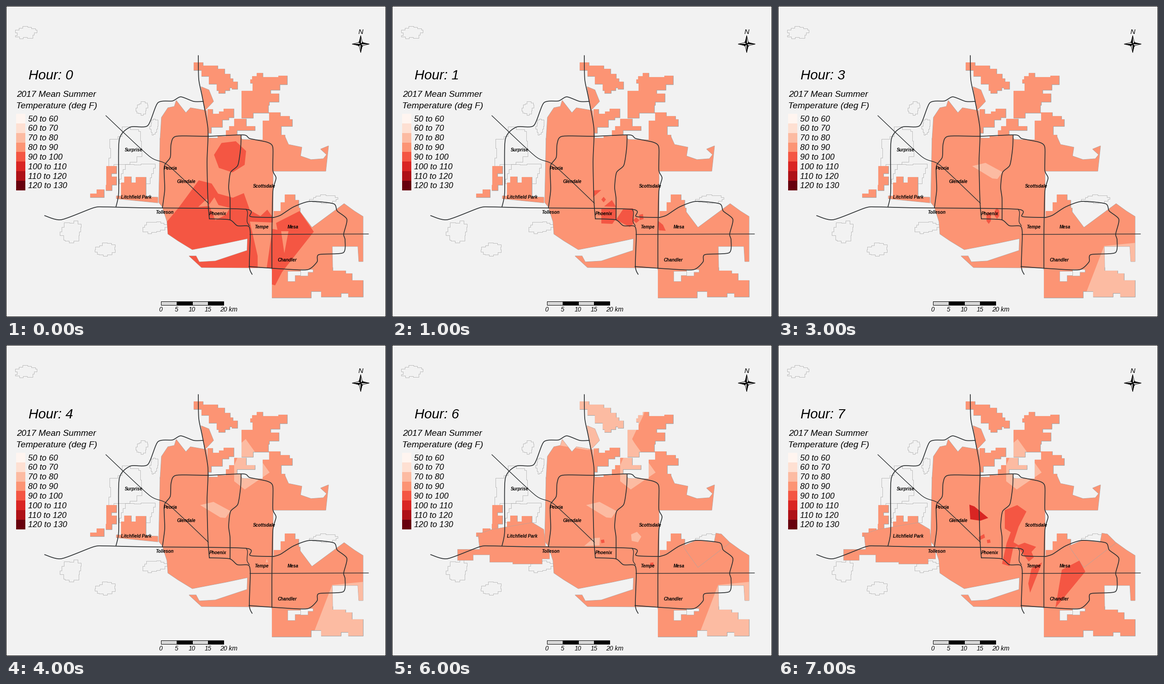
Write a matplotlib script that moves like this. It is 826 by 678 pixels and loops after 8 s.

```python
import numpy as np
import matplotlib.pyplot as plt
from matplotlib.animation import FuncAnimation
from matplotlib.patches import Circle, Polygon, Rectangle
from matplotlib.path import Path

W, H, DPI = 826, 678, 64
PT = 72 / DPI  # points per pixel
BG, ROAD, BORDER = "#f2f2f2", "#2b2f31", "#a5a5a5"
REDS = ["#fff5f0", "#fee0d2", "#fcbba2", "#fc9474",
        "#f45643", "#d92523", "#ae1117", "#67000d"]
LIGHT, WARM, HOT, DEEP = REDS[2:6]
rng = np.random.default_rng(4)

fig = plt.figure(figsize=(W / DPI, H / DPI), dpi=DPI, facecolor="black")
ax = fig.add_axes([0, 0, 1, 1])
ax.set_xlim(0, W)
ax.set_ylim(H, 0)
ax.axis("off")
ax.add_patch(Rectangle((1, 1), W - 2, H - 2, fc=BG, lw=0, zorder=0))


# --- shape rules -------------------------------------------------------------
def pts(*xy):
    return np.array(xy, float).reshape(-1, 2)


def steps(*xy):
    """Closed outline of right angles: across, then down, to each key point."""
    key = pts(*xy)
    ahead = np.roll(key, -1, axis=0)
    corner = np.column_stack([ahead[:, 0], key[:, 1]])
    return np.stack([key, corner], axis=1).reshape(-1, 2)


def cell(x, y, rx, ry, n=5, turn=0.0):
    a = turn + np.arange(n) * 2 * np.pi / n
    return np.column_stack([x + rx * np.cos(a), y + ry * np.sin(a)])


def town(x, y, rx, ry, n=14):
    """Ragged town border."""
    ring = cell(0, 0, rx, ry, n) * rng.uniform(0.65, 1.0, (n, 1))
    return steps(*(ring + (x, y)).ravel())


def curve(*xy, tension=0.35):
    """Smooth path through key points."""
    p = pts(*xy)
    slope = tension * (np.vstack([p[1:], p[-1:]]) - np.vstack([p[:1], p[:-1]]))
    t = np.linspace(0, 1, 9)[:, None]
    parts = [(2 * t**3 - 3 * t**2 + 1) * a + (t**3 - 2 * t**2 + t) * u
             + (3 * t**2 - 2 * t**3) * b + (t**3 - t**2) * v
             for a, b, u, v in zip(p, p[1:], slope, slope[1:])]
    return np.vstack(parts)


def ccw(p):
    x, y = p.T
    area = np.sum(x * np.roll(y, -1) - y * np.roll(x, -1))
    return p if area > 0 else p[::-1]


def fill(p, color, z, edge="none", lw=0.0):
    return ax.add_patch(Polygon(p, closed=True, fc=color, ec=edge,
                                lw=lw * PT, zorder=z))


def label(x, y, s, px, ha="left", weight="normal"):
    return ax.text(x, y, s, fontsize=px * PT, family="Liberation Sans",
                   style="italic", weight=weight, ha=ha, va="baseline",
                   color="black", zorder=8)


# --- land --------------------------------------------------------------------
north = steps(408, 123, 428, 130, 460, 137, 475, 148, 487, 158, 493, 165,
              503, 181, 491, 178, 486, 184, 476, 190, 462, 184, 458, 170,
              441, 153, 425, 140)
stem = pts(424, 176, 441, 183, 451, 208, 432, 228)
crown = pts(335, 292, 338, 243, 352, 222, 366, 219, 370, 206, 391, 233,
            401, 222, 436, 228, 441, 292)
shoulder = steps(438, 225, 449, 235, 463, 230, 473, 224, 495, 243, 484, 248,
                 470, 264, 446, 277, 438, 292)
knee = steps(460, 284, 478, 271, 485, 262, 496, 246, 522, 262, 541, 271,
             502, 282, 510, 292)
centre = pts(332, 428, 335, 288, 511, 288, 514, 291, 560, 292, 580, 305,
             581, 571, 425, 570, 398, 545, 413, 545, 420, 558, 455, 556,
             485, 546, 524, 533, 525, 507, 478, 517, 405, 531, 374, 512,
             352, 497, 350, 470, 340, 438)
column = steps(512, 185, 536, 168, 531, 160, 535, 153, 545, 146, 558, 155,
               592, 152, 611, 171, 595, 183, 575, 191, 593, 209, 572, 216,
               570, 232, 596, 240, 616, 247, 622, 262, 598, 281, 606, 304,
               575, 300, 558, 250, 572, 233, 537, 244)
arm = pts(579, 303, 606, 284, 614, 302, 643, 308, 640, 327, 663, 335,
          690, 333, 697, 324, 684, 312, 701, 305, 695, 360, 579, 360)
bump = steps(582, 447, 597, 428, 606, 411, 628, 423, 636, 440, 639, 462)
valley = pts(578, 461, 638, 447, 665, 483, 735, 431, 757, 447, 776, 459,
             776, 557, 767, 557, 765, 524, 709, 524, 710, 575, 578, 575)
foot = steps(578, 570, 710, 577, 738, 583, 752, 598, 776, 634, 744, 626,
             728, 634, 685, 622, 663, 636)
enclaves = [
    steps(218, 349, 240, 365, 229, 372, 240, 390, 230, 402, 217, 390),
    steps(257, 372, 272, 385, 282, 373, 304, 416, 250, 385),
    pts(240, 414, 330, 417, 330, 429, 240, 420),
    steps(183, 409, 197, 400, 213, 417),
]
land = [north, stem, crown, shoulder, knee, centre, column, arm, bump,
        valley, foot] + enclaves

# areas that join the map later
extra = [
    pts(638, 447, 633, 438, 662, 425, 700, 430, 704, 410, 716, 412, 735, 431,
        665, 485),
    pts(187, 412, 217, 402, 305, 387, 330, 402, 334, 440, 190, 441),
    steps(142, 445, 190, 438, 342, 466, 326, 477, 262, 473, 212, 457,
          176, 469),
]
holes = [steps(612, 578, 640, 587, 628, 600),
         steps(640, 574, 667, 580, 656, 588)]
towns_x_y_size = [(42, 58, 26, 15), (295, 222, 13, 17), (322, 262, 10, 20),
                  (262, 310, 45, 50), (285, 365, 45, 28), (142, 492, 28, 28),
                  (215, 531, 28, 17), (322, 482, 30, 16), (690, 421, 32, 11)]

for box in towns_x_y_size:
    fill(town(*box), "none", 0.5, BORDER, 0.7)
for p in land:
    fill(p, WARM, 1, BORDER, 1.2)
    fill(p, WARM, 1.5)
for p in holes:
    fill(p, BG, 4, BORDER, 0.6)

clip = Path.make_compound_path(
    *[Path(np.vstack([q, q[:1]]), closed=True) for q in map(ccw, land + extra)])

# --- temperature patches and the hours in which each one shows ---------------
timed = [(fill(p, WARM, 1.6, BORDER, 0.6), (5, 6, 7)) for p in extra]


def patch(color, hours, shape):
    art = fill(shape, color, 3)
    art.set_clip_path(clip, ax.transData)
    timed.append((art, hours))


patch(HOT, [0], pts(330, 510, 350, 470, 375, 440, 419, 380, 447, 387, 461, 409,
                    493, 418, 517, 408, 530, 445, 553, 458, 568, 444, 580, 461,
                    580, 472, 530, 470, 547, 545, 547, 575, 380, 575))
patch(WARM, [0], pts(441, 434, 453, 417, 462, 434, 487, 440, 478, 455,
                     455, 467))
patch(WARM, [0], pts(418, 438, 437, 420, 441, 436))
patch(HOT, [0], cell(488, 328, 36, 35, 7, 0.55))
patch(HOT, [0], pts(579, 486, 590, 488, 587, 473, 638, 447, 669, 492, 600, 580,
                    585, 609, 578, 607, 567, 569))
patch(WARM, [0], pts(598, 491, 614, 491, 605, 539))

patch(HOT, [1], pts(438, 402, 455, 401, 437, 417))
patch(HOT, [1], cell(460, 422, 5, 6, 4))
patch(HOT, [1], pts(478, 423, 487, 438, 461, 437))
patch(HOT, [1], pts(455, 441, 487, 440, 488, 462, 479, 475, 455, 474))
patch(HOT, [1], pts(487, 466, 503, 442, 524, 441, 525, 474, 517, 482))
patch(HOT, [1], cell(531, 467, 7, 6, 4))
patch(HOT, [1], cell(542, 460, 6, 8, 4, 0.6))
patch(HOT, [1], pts(578, 468, 589, 477, 595, 490, 580, 489))

patch(HOT, [2, 3], cell(458, 462, 5.5, 13, 6, 0.5))
patch(HOT, [2, 3], cell(476, 452, 5.5, 12, 6, 0.5))
patch(LIGHT, [2, 3, 4, 5, 6], pts(422, 349, 451, 342, 488, 362, 477, 377,
                                  466, 376))
patch(LIGHT, [3, 4, 5, 6], pts(709, 523, 780, 516, 780, 640, 664, 640))
patch(LIGHT, [4], cell(567, 471, 3, 5, 3, -np.pi / 2))
patch(LIGHT, [4, 5, 6, 7], pts(521, 205, 573, 278, 519, 315, 496, 297,
                               496, 262, 503, 246, 512, 213))
patch(LIGHT, [5, 6], pts(355, 100, 560, 100, 547, 152, 522, 205, 545, 246,
                         505, 246, 505, 218, 425, 229, 364, 219))
patch(LIGHT, [6], pts(418, 438, 438, 421, 452, 420, 451, 437))
patch(LIGHT, [6], cell(530, 419, 12, 12, 5, -0.1))
patch(HOT, [6, 7], cell(458, 428, 5, 5, 4, 0.6))
patch(HOT, [6], cell(565, 478, 5, 5, 4, 0.6))

patch(DEEP, [7], pts(416, 348, 427, 352, 457, 377, 440, 383, 418, 380))
patch(HOT, [7], pts(493, 360, 520, 349, 540, 363, 523, 396, 512, 430, 524, 437,
                    511, 443, 503, 482, 487, 477, 497, 432, 506, 408, 493, 400))
patch(HOT, [7], pts(518, 438, 536, 431, 561, 440, 551, 451, 556, 463,
                    545, 472, 524, 444))
patch(HOT, [7], pts(436, 419, 448, 412, 450, 420, 437, 426))
patch(HOT, [7], pts(551, 487, 574, 474, 548, 540, 544, 520))
patch(HOT, [7], pts(617, 490, 655, 470, 668, 494, 603, 573))


# --- roads -------------------------------------------------------------------
def road(*xy, lw=1.7):
    x, y = curve(*xy).T
    ax.plot(x, y, color=ROAD, lw=lw * PT, zorder=6,
            solid_joinstyle="round", solid_capstyle="round")


road(418, 108, 419, 160, 427, 200, 439, 268, 437, 340, 439, 425, 442, 464)
road(442, 464, 486, 466, 503, 479, 527, 480, 531, 498, 529, 568, 535, 585)
road(84, 457, 120, 466, 190, 440, 215, 438, 300, 440, 520, 443, 531, 459,
     582, 461)
road(582, 461, 597, 456, 625, 438, 660, 426, 712, 431, 720, 447, 741, 465,
     734, 497, 737, 510, 733, 538, 680, 542, 676, 558, 655, 575, 598, 573,
     528, 568)
road(530, 498, 788, 497, lw=1.4)
road(217, 239, 312, 328, 352, 347, 440, 430, lw=1.4)
road(239, 438, 245, 405, 246, 292, 270, 264, 308, 261, 330, 211, 362, 207,
     380, 198, 408, 208, 429, 208)
road(340, 440, 345, 400, 344, 350, 357, 330, 359, 300, 370, 284, 440, 284,
     516, 281, 530, 289, 568, 297, 580, 308, 580, 358, 587, 375, 580, 405,
     578, 500, 578, 572)
road(511, 282, 510, 310, 504, 347, 488, 363, 484, 395, 487, 420, 487, 466)
road(522, 443, 525, 450, 524, 470, 529, 479, lw=1.4)

# --- legend and labels ---------------------------------------------------------
hour_text = label(49, 160.5, "", 29.5)
label(23.5, 198, "2017 Mean Summer", 19)
label(22.5, 223, "Temperature (deg F)", 19.3)
STEP = 20.85
for i, c in enumerate(REDS):
    ax.add_patch(Rectangle((22, 235 + i * STEP), 20, STEP, fc=c, lw=0))
    label(47.5, 251.5 + i * STEP, f"{50 + 10 * i} to {60 + 10 * i}", 17.9)

places = {"Surprise": (277, 317), "Peoria": (358, 357), "Glendale": (392, 386),
          "Scottsdale": (561, 396), "Litchfield Park": (283, 420),
          "Tolleson": (345, 453), "Phoenix": (461, 456), "Tempe": (556, 485),
          "Mesa": (624, 485), "Chandler": (611, 557)}
for name, (x, y) in places.items():
    label(x, y, name, 9.6, "center", "bold")

# scale bar
for i in range(4):
    ax.add_patch(Rectangle((336.5 + 34.2 * i, 643.5), 34.2, 8, ec="black",
                           fc="black" if i % 2 else "#d9d9d9", lw=PT, zorder=7))
    label(336 + 34.3 * i, 666, str(5 * i), 13.5, "center")
label(465, 666, "20 km", 14)

# compass
label(770.5, 61, "N", 15, "center")
hub = np.array([771, 83])
ax.add_patch(Circle(hub, 6, fc="none", ec="black", lw=PT, zorder=7))
for k in range(4):
    tip, waist = [(k + d) * np.pi / 2 for d in (0, 0.5)]
    for side, c in ((-1, "black"), (1, "white")):
        b = tip + side * np.pi / 4
        fill([hub, hub + 18.5 * np.array([np.cos(tip), np.sin(tip)]),
              hub + 5 * np.array([np.cos(b), np.sin(b)])], c, 8, "black", 0.9)


def update(hour):
    hour_text.set_text(f"Hour: {hour}")
    for art, hours in timed:
        art.set_visible(hour in hours)
    return [hour_text]


anim = FuncAnimation(fig, update, frames=8, interval=1000, repeat=True,
                     repeat_delay=0, blit=False)
plt.show()
```
